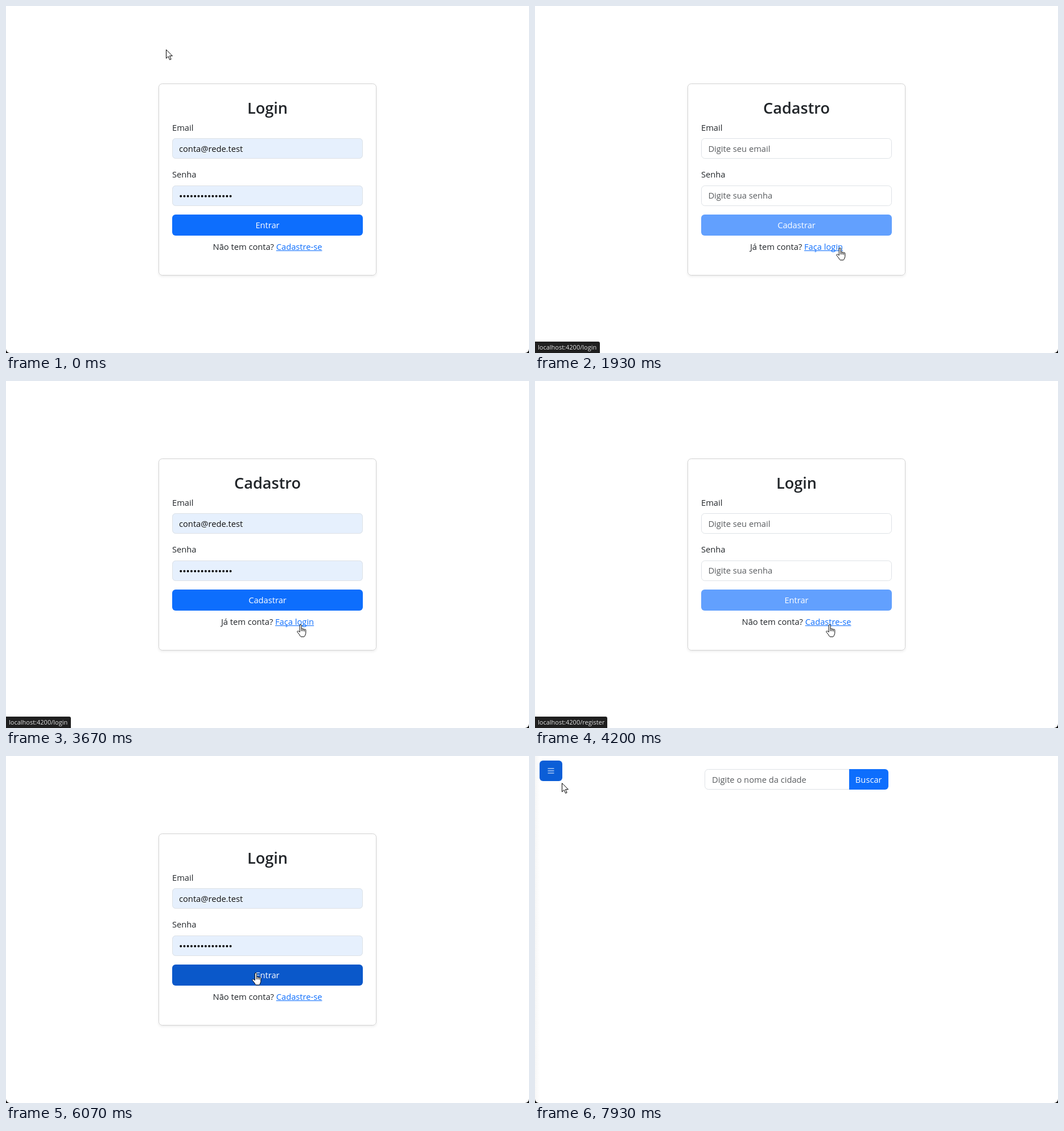
An HTML page with a canvas for the animation above (8 s loop, 919 px wide and 609 px high).

```html
<!DOCTYPE html>
<html lang="pt-BR">
<head>
<meta charset="utf-8">
<title>Login</title>
<style>
html, body { margin: 0; width: 100%; height: 100%; overflow: hidden; background: #fff; }
canvas { display: block; width: 919px; height: 609px; }
</style>
</head>
<body>
<canvas id="stage" width="919" height="609"></canvas>
<script>
const ctx = document.getElementById('stage').getContext('2d');
const LOOP = 8000;
const FAMILY = '"Open Sans", "Noto Sans", sans-serif';
const BODY = '14.7px ' + FAMILY;
const TITLE = '600 27.1px ' + FAMILY;
const SMALL = '11px ' + FAMILY;

const INK = '#212529', MUTED = '#595c5f', LINE = '#dee2e6', BLUE = '#0d6efd';
const PRIMARY = [13, 110, 253], HOVER = [11, 94, 215], ACTIVE = [10, 88, 202];

const CENTER = 459.5, LEFT = 292, WIDTH = 335, CONTROL = 36.48;

// Pointer hotspot: time, x, y
const PATH = [
  [0, 281, 76], [270, 126, 260], [530, 270, 532], [870, 544, 464],
  [1070, 560, 440], [1200, 560, 440], [1670, 535, 424], [2470, 535, 424],
  [2870, 496, 424], [3070, 475, 421], [3330, 506, 429], [3730, 517, 427],
  [4670, 517, 427], [5070, 461, 392], [5470, 438, 380], [6070, 438, 380],
  [6130, 440, 377], [6520, 440, 377], [6530, 434, 377], [6670, 434, 377],
  [7330, 42, 58], [7470, 47, 47], [LOOP, 47, 47]
];

const HAND = new Path2D('M5.3 13.6V2.1a1.5 1.5 0 0 1 3 0V8.2a1.4 1.4 0 0 1 2.6 .5' +
  'a1.4 1.4 0 0 1 2.5 .7a1.3 1.3 0 0 1 2.4 .9V15.4c0 2.1-1.2 3.2-1.7 4.9' +
  'c-.3 1.2-.9 1.6-2 1.6H8c-1 0-1.6-.5-2.1-1.5c-.9-1.9-2.4-3.8-4.6-6.3' +
  'c-1.4-1.7 .6-3.1 2-1.9Z');
const KNUCKLES = new Path2D('M8.3 8.2V12M10.9 8.7V12.2M13.4 9.4V12.5');
const ARROW = new Path2D('M.5 .7V15.9L4.1 12.5L6.7 18.4L9.1 17.3L6.5 11.6H11.4Z');

const clamp01 = v => Math.max(0, Math.min(1, v));

function mix(a, b, p) {
  return `rgb(${a.map((v, i) => Math.round(v + (b[i] - v) * clamp01(p)))})`;
}

function slope(i, axis) {
  if (i < 0 || i >= PATH.length - 1) return 0;
  return (PATH[i + 1][axis] - PATH[i][axis]) / (PATH[i + 1][0] - PATH[i][0]);
}

function tangent(i, axis) {
  const a = slope(i - 1, axis), b = slope(i, axis);
  return a * b > 0 ? 2 * a * b / (a + b) : 0;
}

// Monotone cubic interpolation, so the pointer never overshoots a key
function pointer(t) {
  let i = 0;
  while (i < PATH.length - 2 && t >= PATH[i + 1][0]) i++;
  const span = PATH[i + 1][0] - PATH[i][0];
  const p = (t - PATH[i][0]) / span, q = 1 - p;
  return [1, 2].map(axis => Math.round(
    PATH[i][axis] * q * q * (1 + 2 * p) + PATH[i + 1][axis] * p * p * (3 - 2 * p) +
    span * p * q * (tangent(i, axis) * q - tangent(i + 1, axis) * p)));
}

// Edges snap to whole pixels, as browser layout boxes do
function box(x, y, w, h, radius, fill, stroke) {
  const top = Math.round(y), height = Math.round(y + h) - top;
  ctx.beginPath();
  ctx.roundRect(x, top, w, height, radius);
  ctx.fillStyle = fill;
  ctx.fill();
  if (stroke) {
    ctx.beginPath();
    ctx.roundRect(x + .5, top + .5, w - 1, height - 1, radius);
    ctx.strokeStyle = stroke;
    ctx.lineWidth = 1;
    ctx.stroke();
  }
}

function text(str, x, y, color, font = BODY, align = 'left') {
  ctx.font = font;
  ctx.textAlign = align;
  ctx.fillStyle = color;
  ctx.fillText(str, x, Math.round(y));
}

function field(label, y, placeholder, filled) {
  text(label, LEFT, y - 13.2, INK);
  box(LEFT, y, WIDTH, CONTROL, 6, filled ? '#e6f0fd' : '#fff', LINE);
  if (!filled) text(placeholder, 304.4, y + 23.8, MUTED);
}

function dots(x, y, count) {
  ctx.fillStyle = '#000';
  for (let i = 0; i < count; i++) {
    ctx.beginPath();
    ctx.arc(x + i * 6.24, y, 1.95, 0, 7);
    ctx.fill();
  }
}

function footer(question, link) {
  ctx.font = BODY;
  const lead = ctx.measureText(question + ' ').width;
  const width = ctx.measureText(link).width;
  const x = CENTER - (lead + width) / 2;
  text(question, x, 428, INK);
  text(link, x + lead, 428, BLUE);
  ctx.fillRect(x + lead, 429, width, 1);
}

function form(page, filled, buttonColor) {
  ctx.save();
  ctx.shadowColor = 'rgba(0,0,0,.075)';
  ctx.shadowBlur = 4;
  ctx.shadowOffsetY = 2;
  box(268, 136, 383, 337, 6, '#fff');
  ctx.restore();
  box(268, 136, 383, 337, 6, '#fff', '#d2d2d2');
  text(page.title, CENTER, 189, INK, TITLE, 'center');
  field('Email', 232, 'Digite seu email', filled);
  field('Senha', 314.6, 'Digite sua senha', filled);
  if (filled) {
    text('conta@rede.test', 304, 256, '#111');
    dots(307.2, 333.7, 15);
  }
  box(LEFT, 366.4, WIDTH, CONTROL, 6, filled ? buttonColor : '#62a0fe');
  text(page.button, CENTER, 390, '#fff', BODY, 'center');
  footer(page.question, page.link);
}

const LOGIN = { title: 'Login', button: 'Entrar', question: 'Não tem conta?', link: 'Cadastre-se' };
const REGISTER = { title: 'Cadastro', button: 'Cadastrar', question: 'Já tem conta?', link: 'Faça login' };

function home(t) {
  const shade = ctx.createLinearGradient(0, 0, 9, 0);
  shade.addColorStop(0, '#f7f7f7');
  shade.addColorStop(1, '#fff');
  ctx.fillStyle = shade;
  ctx.fillRect(0, 0, 9, 609);

  box(8, 8, 40, 36, 6, mix(PRIMARY, HOVER, (t - 7610) / 200));
  ctx.fillStyle = '#fff';
  for (const y of [21.5, 25.5, 29.5]) ctx.fillRect(22.5, y, 11, 1);

  box(298, 23, 255, CONTROL, [6, 0, 0, 6], '#fff', LINE);
  text('Digite o nome da cidade', 311, 47, MUTED);
  box(552, 23, 69, CONTROL, [0, 6, 6, 0], BLUE);
  text('Buscar', 586.2, 47, '#fff', BODY, 'center');
}

function status(str, width) {
  box(0, 589, width, 20, [0, 3, 0, 0], '#1f1f1f');
  text(str, 5, 603, '#e3e3e3', SMALL);
}

function drawPointer(t) {
  const [x, y] = pointer(t);
  const onLink = x >= 474 && x <= 556 && y >= 412 && y <= 434;
  const onButton = x >= 292 && x <= 627 && y >= 366 && y <= 403;
  const hand = t < 6530 && (onLink || onButton);
  ctx.save();
  ctx.translate(hand ? x - 6 : x, y);
  ctx.fillStyle = '#fff';
  ctx.strokeStyle = '#000';
  ctx.lineWidth = 1;
  ctx.lineJoin = 'round';
  const shape = hand ? HAND : ARROW;
  ctx.fill(shape);
  ctx.stroke(shape);
  if (hand) ctx.stroke(KNUCKLES);
  ctx.restore();
}

function corners() {
  ctx.fillStyle = '#000';
  ctx.beginPath();
  ctx.rect(0, 0, 919, 609);
  ctx.roundRect(0, 0, 919, 609, [0, 0, 7, 7]);
  ctx.fill('evenodd');
}

function draw(t) {
  ctx.fillStyle = '#fff';
  ctx.fillRect(0, 0, 919, 609);

  const registering = t >= 1930 && t < 4200;
  if (t >= 6130) {
    home(t);
  } else {
    const empty = (t >= 1930 && t < 2000) || (t >= 4200 && t < 4270);
    const color = t < 5930 ? mix(PRIMARY, HOVER, (t - 5030) / 160)
                           : mix(HOVER, ACTIVE, (t - 5870) / 200);
    form(registering ? REGISTER : LOGIN, !empty, color);
  }

  corners();
  if (registering) status('localhost:4200/login', 114);
  else if (t >= 1870 && t < 5330) status('localhost:4200/register', 127);
  drawPointer(t);
}

function recordedTime(t) {
  const step = Math.floor(t * .015 + .0501);
  return Math.min(LOOP - 1, Math.round(step * 20 / 3) * 10);
}

const start = performance.now();
function tick() {
  draw(recordedTime((performance.now() - start) % LOOP));
  requestAnimationFrame(tick);
}
tick();
</script>
</body>
</html>
```
